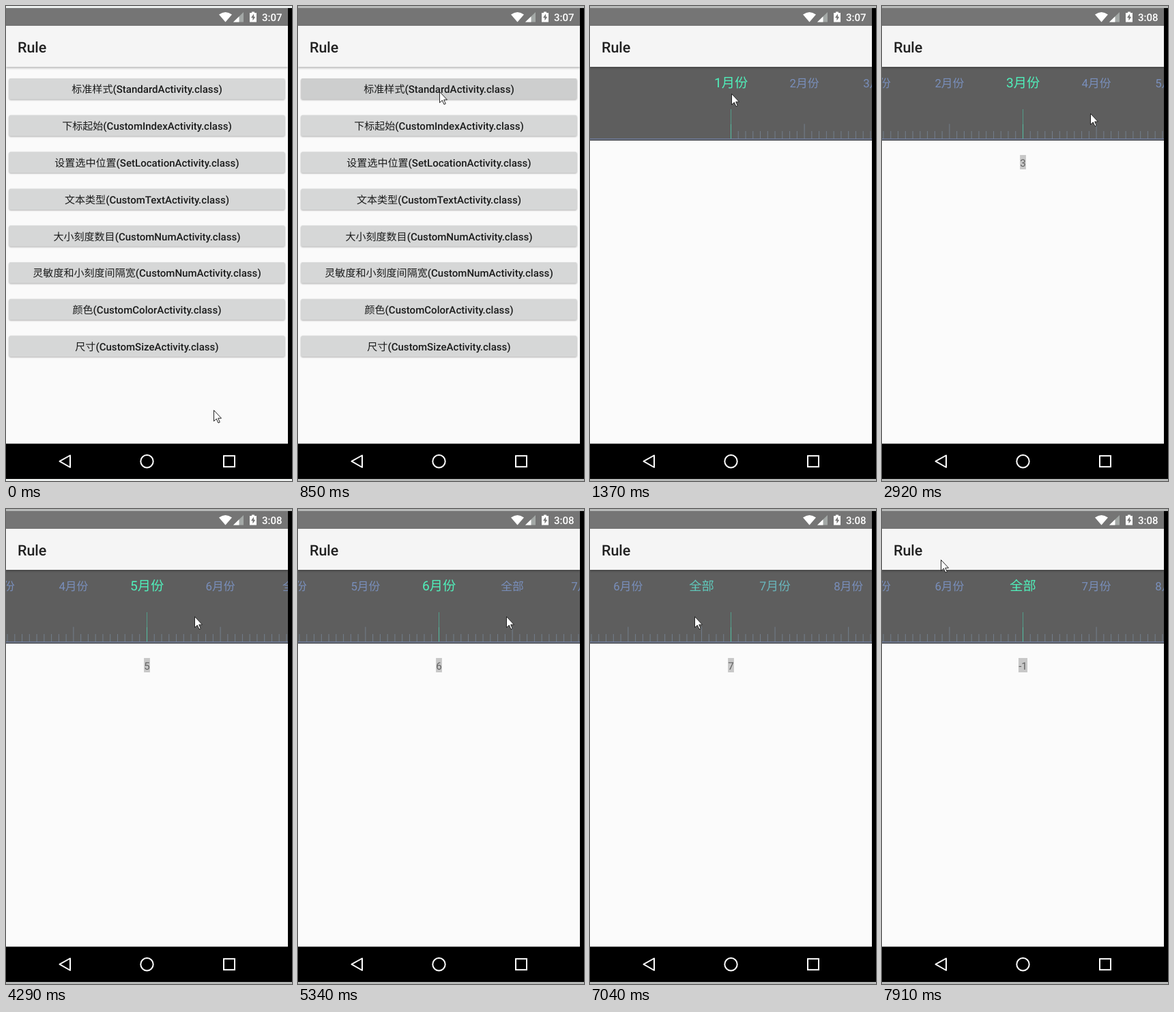
These frames come from a looping animation (419 px wide and 695 px high, 8000 ms). An HTML page:

```html
<!DOCTYPE html>
<html lang="zh-CN">
<head>
<meta charset="utf-8">
<title>Rule</title>
<style>
html, body { margin: 0; width: 100%; height: 100%; overflow: hidden; background: #000; }
svg { display: block; width: 419px; height: 695px; font-family: Roboto, "Noto Sans CJK SC", "Noto Sans CJK", sans-serif; }
text { text-rendering: geometricPrecision; }
.title { font-size: 21.5px; font-weight: 500; fill: #212121; }
.button { font-size: 15.06px; font-weight: 500; fill: #1b1c1c; text-anchor: middle; }
.button .han { font-weight: 400; }
.clock { font-size: 15px; font-weight: 500; fill: #fff; text-anchor: end; }
.month, .value { text-anchor: middle; }
.value { font-size: 15.06px; fill: #606060; }
.raised { fill: #d6d7d7; filter: drop-shadow(0 1px 1px rgba(0,0,0,.3)); }
.pressed { fill: #cdcece; }
.bar { filter: drop-shadow(0 2px 1.5px rgba(0,0,0,.25)); }
</style>
</head>
<body>
<svg viewBox="0 0 419 695">
  <defs>
    <clipPath id="screen"><rect y="3" width="413" height="689"/></clipPath>
    <g id="appBar">
      <rect class="bar" y="29" width="413" height="60" fill="#f5f5f5"/>
      <text class="title" x="17" y="67.5">Rule</text>
    </g>
  </defs>
  <rect width="419" height="695"/>
  <g id="edges"><rect width="419" height="3"/><rect y="692" width="419" height="3"/></g>
  <g clip-path="url(#screen)">
    <rect y="3" width="413" height="26" fill="#757575"/>
    <g id="home">
      <rect y="29" width="413" height="611.4" fill="#fafafa"/>
      <use href="#appBar"/>
      <g id="buttons"></g>
    </g>
    <g id="detail">
      <rect y="3" width="413" height="26" fill="#757575"/>
      <rect y="29" width="413" height="611.4" fill="#fbfbfb"/>
      <rect y="89" width="413" height="108" fill="#5e5e5e"/>
      <g id="ruler"><path id="ticks" fill="none" stroke="#727e8b"/></g>
      <path d="M0 194.5H413" stroke="#7080a8"/>
      <path d="M0 196.5H413" stroke="#4f535c"/>
      <path d="M206.5 151V173" stroke="#529b88"/>
      <path d="M206.5 173V194" stroke="#53bfa1"/>
      <use href="#appBar"/>
      <rect id="valueBox" y="218" height="21" fill="#c8c8c8"/>
      <text id="value" class="value" x="206.5" y="234.5"></text>
    </g>
    <path d="M312 12.5Q321.5 5.5 331 12.5L321.5 23.5Z" fill="#fff"/>
    <path d="M348 9V23.5H333Z" fill="#a3a8a6"/>
    <path d="M341.5 15.3V23.5H333Z" fill="#fff"/>
    <path d="M357 10H360V8.5H364V10H367V23.5H357Z" fill="#fff"/>
    <path d="M363 11.5L359 17.3H361.5V21.5L365.3 15.7H363Z" fill="#757575"/>
    <text id="clock" class="clock" x="404.5" y="22"></text>
    <g fill="none" stroke="#fff" stroke-width="2">
      <path d="M78.5 666.2L94 657.5V675Z" stroke-linejoin="round"/>
      <circle cx="206.5" cy="666.2" r="9.2"/>
      <rect x="319" y="658.2" width="16" height="16"/>
    </g>
  </g>
  <path id="cursor" d="M.5.5V16.5L4.3 13 7 19 9.3 18 6.7 12.2H11.5Z" fill="#fff" stroke="#222"/>
</svg>
<script>
const LOOP = 8000, STEP = 171.7, CENTER = 206.5, UNIT = 107.6;
const PRESS = 5, ENTER = 7, MINUTE = 10, DRAG_Y = 157;
const $ = id => document.getElementById(id);

function set(node, attrs) {
  for (const name in attrs) node.setAttribute(name, attrs[name]);
  return node;
}

function add(parent, tag, attrs, text = '') {
  const node = set(document.createElementNS('http://www.w3.org/2000/svg', tag), attrs);
  node.textContent = text;
  return parent.appendChild(node);
}

const entries = [
  ['标准样式', 'Standard'], ['下标起始', 'CustomIndex'],
  ['设置选中位置', 'SetLocation'], ['文本类型', 'CustomText'],
  ['大小刻度数目', 'CustomNum'], ['灵敏度和小刻度间隔宽', 'CustomNum'],
  ['颜色', 'CustomColor'], ['尺寸', 'CustomSize']
];
const buttons = entries.map(([label, name], i) => {
  const y = 106 + UNIT / 2 * i;
  const box = add($('buttons'), 'rect', { class: 'raised', x: 4.5, y, width: 404, height: 30.5, rx: 2 });
  const text = add($('buttons'), 'text', { class: 'button', x: CENTER, y: y + 21.3 });
  add(text, 'tspan', { class: 'han' }, label);
  add(text, 'tspan', {}, `(${name}Activity.class)`);
  return box;
});

const months = Array.from({ length: 12 }, (_, i) => `${i + 1}月份`);
months.splice(6, 0, '全部');
const labels = months.map((name, i) =>
  add($('ruler'), 'text', { class: 'month', x: i * UNIT, y: 119.3 }, name));

let ticks = '';
for (let i = 0; i <= 120; i++) ticks += `M${i * UNIT / 10} ${i % 10 ? 183 : 172.5}V194`;
set($('ticks'), { d: ticks });

// Times count in steps; each drag ends on a month index
const drags = [
  { start: 10, end: 16, from: 305, to: 185, month: 2 },
  { start: 17, end: 20, from: 305, to: 195, month: 3 },
  { start: 21, end: 24, from: 300, to: 205, month: 4 },
  { start: 25, end: 27, from: 276, to: 195, month: 5 },
  { start: 31, end: 36, from: 305, to: 92, month: 7 },
  { start: 38, end: 43, from: 92, to: 193, month: 6 }
];

// The pointer rests one step after each drag, then travels to the next
const pointer = [[0, 304, 591], [2, 183, 200], [3, 207, 125], [ENTER, 207, 125], [8, 207, 128]];
const scroll = [[0, 0]];
for (const { start, end, from, to, month } of drags) {
  pointer.push([start, from, DRAG_Y], [end, to, DRAG_Y], [end + 1, to, DRAG_Y]);
  scroll.push([start, scroll[scroll.length - 1][1]], [end, month]);
}
pointer.push([46, 86, 74]);

function between(keys, k) {
  const next = keys.findIndex(key => key[0] > k);
  if (next < 0) return keys[keys.length - 1].slice(1);
  const a = keys[next - 1], b = keys[next];
  const p = (k - a[0]) / (b[0] - a[0]);
  return a.slice(1).map((v, i) => v + (b[i + 1] - v) * p);
}

const mix = (a, b, p) => `rgb(${a.map((v, i) => Math.round(v + (b[i] - v) * p))})`;

function drawRuler(position) {
  set($('ruler'), { transform: `translate(${CENTER - position * UNIT} 0)` });
  labels.forEach((label, i) => {
    const focus = Math.max(0, 1 - Math.abs(i - position));
    label.style.fontSize = 16.8 + 2.4 * focus + 'px';
    label.style.fill = mix([121, 143, 188], [80, 240, 187], focus);
  });
}

function drawValue(k) {
  const last = drags.filter(drag => drag.end <= k).pop();
  const value = last ? String(parseInt(months[last.month]) || -1) : '';
  const width = value && 4.5 + 4.3 * value.length;
  $('value').textContent = value;
  set($('valueBox'), { x: CENTER - width / 2, width: width || 0 });
}

function draw(k) {
  const [x, y] = between(pointer, k).map(Math.round);
  const entering = k === ENTER;
  set($('cursor'), { transform: `translate(${x} ${y})` });
  set($('edges'), { fill: k < PRESS ? '#ecefee' : '#b8bab9' });
  buttons[0].classList.toggle('pressed', k >= PRESS);
  $('home').style.display = k > ENTER ? 'none' : '';
  $('detail').style.display = k < ENTER ? 'none' : '';
  set($('detail'), { transform: `translate(0 ${entering ? 34 : 0})`, opacity: entering ? .5 : 1 });
  $('clock').textContent = k < MINUTE ? '3:07' : '3:08';
  drawRuler(between(scroll, k)[0]);
  drawValue(k);
}

let shown = -1;
function tick() {
  const k = Math.floor((performance.now() % LOOP + 15) / STEP);
  if (k !== shown) draw(shown = k);
  requestAnimationFrame(tick);
}
tick();
</script>
</body>
</html>
```
